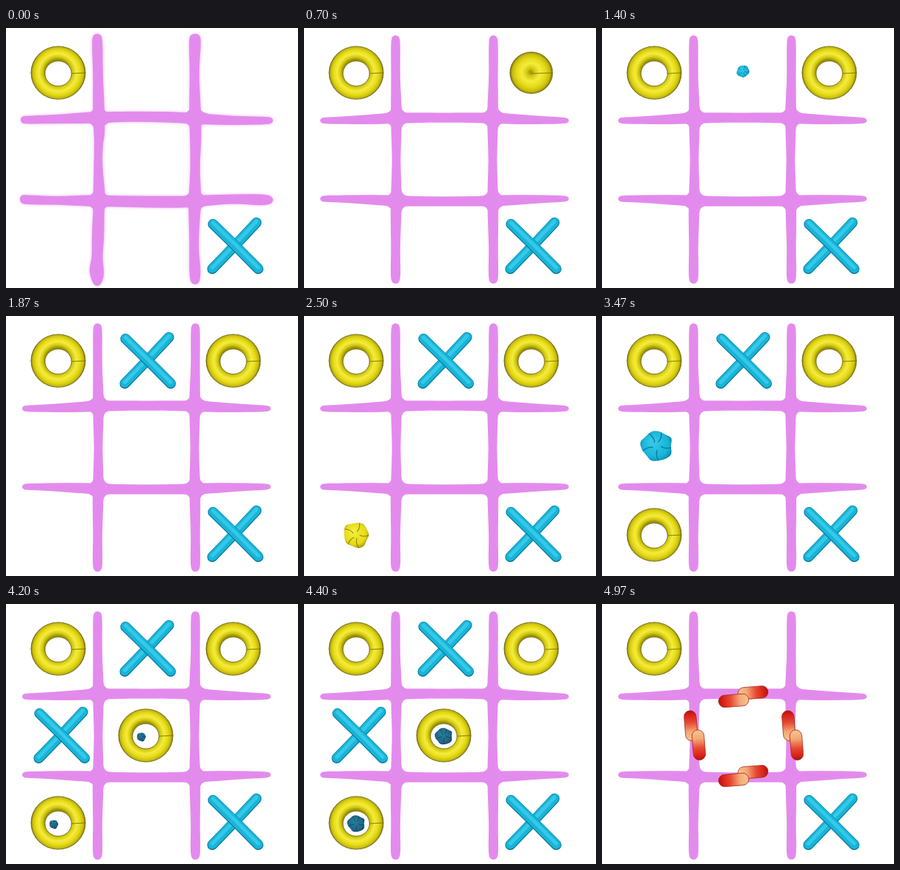
These frames come from a looping animation (397x354 px, 5 s). An HTML page with a canvas:

```html
<!DOCTYPE html>
<html lang="en">
<head>
<meta charset="utf-8">
<title>Clay tic-tac-toe</title>
<style>
html, body { margin: 0; width: 100%; height: 100%; overflow: hidden; background: #fff; }
canvas { display: block; }
</style>
</head>
<body>
<canvas id="stage" width="397" height="354"></canvas>
<script>
const ctx = document.getElementById('stage').getContext('2d');
const LOOP = 5000;
const PINK = '#e38bed';
const BLUE = { dark: '#08789a', base: '#18b4d8', light: '#35c9e8' };
const YELLOW = { dark: '#8b8208', base: '#e6da16', light: '#f4ec3c' };
const TEAL = { dark: '#16384c', base: '#1d6888', light: '#287c9c' };

const clamp = v => Math.max(0, Math.min(1, v));
const mix = (a, b, p) => a + (b - a) * p;

function at(x, y, scale, draw) {
  ctx.save();
  ctx.translate(x, y);
  ctx.scale(scale, scale);
  draw();
  ctx.restore();
}

// Closed smooth curve through the midpoints of its corners.
function smooth(pts) {
  const mid = i => {
    const a = pts[i % pts.length], b = pts[(i + 1) % pts.length];
    return [(a[0] + b[0]) / 2, (a[1] + b[1]) / 2];
  };
  ctx.moveTo(...mid(0));
  for (let i = 1; i <= pts.length; i++) ctx.quadraticCurveTo(...pts[i % pts.length], ...mid(i));
  ctx.closePath();
}

// Each knot is [position along the bar, centre line, half width].
function bar(knots, upright) {
  const side = s => knots.map(([p, c, h]) => upright ? [c + s * h, p] : [p, c + s * h]);
  ctx.beginPath();
  smooth([...side(-1), ...side(1).reverse()]);
  ctx.fill();
}

function joint(x, y) {
  const r = 17, c = 6;
  ctx.beginPath();
  for (let i = 0; i < 4; i++) {
    const a = i * Math.PI / 2, cos = Math.cos(a), sin = Math.sin(a);
    const turn = (u, v) => [x + u * cos - v * sin, y + u * sin + v * cos];
    const start = turn(r, -c);
    if (i) ctx.lineTo(...start); else ctx.moveTo(...start);
    ctx.lineTo(...turn(r, c));
    ctx.quadraticCurveTo(...turn(c + 1, c + 1), ...turn(c, r));
  }
  ctx.fill();
}

function smoothGrid() {
  ctx.fillStyle = PINK;
  for (const [x, lean] of [[124.5, 1], [257.5, -1]]) {
    bar([[10, x, 5], [22, x, 6.5], [70, x, 6], [108, x + lean, 7.5], [145, x + lean, 7],
      [180, x + lean, 5.5], [215, x + lean, 7], [255, x + lean / 2, 7.5],
      [300, x, 6], [336, x, 7], [348, x, 5]], true);
  }
  for (const [y, bow] of [[126, -4], [232.5, 3.5]]) {
    bar([[22, y, 4], [36, y, 4.5], [75, y + bow / 5, 6], [112, y + bow * .7, 7.5],
      [150, y + bow, 7], [190, y + bow, 6.5], [235, y + bow, 7],
      [272, y + bow * .7, 7.5], [310, y + bow / 5, 6], [348, y, 4.5], [360, y, 3.5]]);
  }
  for (const x of [126, 257]) for (const y of [122.5, 235.5]) joint(x, y);
}

function roughGrid() {
  ctx.save();
  ctx.fillStyle = PINK;
  ctx.shadowColor = '#eebcf4';
  ctx.shadowBlur = 4;
  bar([[8, 124, 5], [18, 124, 7.5], [60, 125, 6.5], [110, 126, 8], [146, 127, 7.5], [155, 126, 6],
    [185, 125, 5.5], [230, 127, 8.5], [250, 126, 7.5], [285, 125, 8.5], [312, 124, 7],
    [328, 123, 10], [340, 124, 9], [351, 124, 4]], true);
  bar([[8, 257, 6], [18, 257, 8.5], [60, 256, 6], [112, 257, 8], [150, 258, 8], [190, 257, 6],
    [235, 257, 9], [260, 256, 7.5], [300, 255.5, 6], [330, 257, 8], [349, 257, 6]], true);
  bar([[20, 125, 5], [32, 125, 5.5], [70, 124, 6], [115, 122, 8], [150, 121, 7], [190, 120.5, 7],
    [240, 122, 7.5], [270, 124, 7.5], [310, 126, 6], [350, 126, 5.5], [363, 126, 4]]);
  bar([[19, 233, 6], [32, 234, 6.5], [70, 235, 5.5], [115, 235, 8], [150, 236, 7.5], [190, 236.5, 8],
    [240, 237, 8], [270, 235, 7.5], [310, 232.5, 6], [348, 234, 8], [363, 234, 5]]);
  ctx.shadowColor = 'transparent';
  for (const x of [126, 257]) for (const y of [122.5, 235.5]) joint(x, y);
  ctx.restore();
}

function ball(x, y, r, tone, seed) {
  const wobble = i => r * (.98 + .1 * Math.sin(i * 2.3 + seed) + .05 * Math.sin(i * 5.1 + seed * 2));
  const pts = Array.from({ length: 13 }, (_, i) => {
    const a = i / 13 * Math.PI * 2;
    return [Math.cos(a) * wobble(i), Math.sin(a) * wobble(i)];
  });
  at(x, y, 1, () => {
    const g = ctx.createRadialGradient(-r * .25, -r * .3, r * .1, 0, 0, r * 1.12);
    g.addColorStop(0, tone.light);
    g.addColorStop(.7, tone.base);
    g.addColorStop(1, tone.dark);
    ctx.fillStyle = g;
    ctx.beginPath();
    smooth(pts);
    ctx.fill();
    ctx.clip();
    ctx.strokeStyle = tone.dark;
    ctx.lineWidth = Math.max(.7, r * .06);
    for (let i = 0; i < 5; i++) {
      const a = i * 1.35 + seed, u = Math.cos(a) * r, v = Math.sin(a) * r;
      ctx.beginPath();
      ctx.moveTo(u, v);
      ctx.quadraticCurveTo(u * .55 - v * .2, v * .55 + u * .2, u * .25, v * .25);
      ctx.stroke();
    }
  });
}

function ring(x, y, hole = 1) {
  at(x, y, 1, () => {
    const inner = 18 * hole, outer = mix(29, 37, hole);
    const g = ctx.createRadialGradient(-1, -1, Math.max(0, inner - 1), 0, 0, outer);
    g.addColorStop(0, '#989008');
    g.addColorStop(.18, '#d2c810');
    g.addColorStop(.42, YELLOW.light);
    g.addColorStop(.68, YELLOW.base);
    g.addColorStop(.88, '#c4ba10');
    g.addColorStop(1, '#766e08');
    ctx.fillStyle = g;
    ctx.beginPath();
    ctx.ellipse(0, 0, outer, outer * .975, 0, 0, Math.PI * 2);
    ctx.ellipse(0, 1, inner, inner * .95, 0, 0, Math.PI * 2);
    ctx.fill('evenodd');
    ctx.lineWidth = .8;
    ctx.strokeStyle = '#6c6510';
    ctx.stroke();
  });
}

function arm(x1, y1, x2, y2) {
  ctx.lineCap = 'round';
  const layers = [[14, 0, BLUE.dark], [12.2, -.5, BLUE.base], [5, -1.8, BLUE.light]];
  for (const [width, shift, color] of layers) {
    ctx.strokeStyle = color;
    ctx.lineWidth = width;
    ctx.beginPath();
    ctx.moveTo(x1, y1 + shift);
    ctx.quadraticCurveTo((x1 + x2) / 2 + 1, (y1 + y2) / 2 + shift, x2, y2 + shift);
    ctx.stroke();
  }
}

function cross(x, y, size = 1) {
  at(x, y, 1, () => {
    arm(28.5 * size, -32 * size, -31.5 * size, 31 * size);
    arm(-30.5 * size, -30 * size, 31 * size, 31 * size);
  });
}

function growRing(x, y, p) {
  if (p < .5) ball(x, y, mix(8, 28, p * 2), YELLOW, p * 9);
  else ring(x, y, (p - .5) * 2);
}

function growCross(x, y, p) {
  if (p >= .5) cross(x, y, mix(.4, 1, (p - .5) * 2));
  if (p < .75) ball(x - 1.5, y - 2, p < .5 ? mix(8.5, 22, p * 2.2) : mix(22, 6, (p - .5) * 4), BLUE, p * 9 + 1);
}

function pill(x, y, flip) {
  at(x, y, 1, () => {
    ctx.rotate(-.08);
    ctx.scale(flip, 1);
    const g = ctx.createLinearGradient(-21, 0, 21, 0);
    g.addColorStop(0, '#f8c890');
    g.addColorStop(.3, '#f4a878');
    g.addColorStop(.6, '#e64a32');
    g.addColorStop(.85, '#d92018');
    g.addColorStop(1, '#a81410');
    ctx.fillStyle = g;
    ctx.strokeStyle = '#a8281c';
    ctx.lineWidth = .8;
    ctx.beginPath();
    ctx.roundRect(-20.5, -8.2, 41, 16.4, 8);
    ctx.fill();
    ctx.stroke();
  });
}

function pills(x, y, upright, size) {
  at(x, y, size, () => {
    if (upright) ctx.rotate(-Math.PI / 2);
    pill(13.3, -5.2, 1);
    pill(-13, 5.5, -1);
  });
}

const moves = [
  { draw: growRing, x: 309, y: 61, start: 500, end: 900, steps: 8 },
  { draw: growCross, x: 193, y: 61, start: 1400, end: 1870, steps: 9 },
  { draw: growRing, x: 71, y: 298, start: 2370, end: 2770, steps: 8 },
  { draw: growCross, x: 76, y: 179, start: 3270, end: 3700, steps: 9 }
];

function stepped(t, start, end, steps) {
  return Math.floor(clamp((t - start) / (end - start)) * steps + 1e-6) / steps;
}

function render(t) {
  ctx.fillStyle = '#fff';
  ctx.fillRect(0, 0, 397, 354);
  if (t < 500) roughGrid(); else smoothGrid();
  ring(71, 61);
  cross(312, 297);

  if (t >= 4900) {
    const size = t < 4970 ? .5 : 1;
    for (const y of [126, 234]) pills(192, y, false, size);
    for (const x of [126, 259]) pills(x, 179, true, size);
    return;
  }
  for (const m of moves) {
    if (t >= m.start) m.draw(m.x, m.y, stepped(t, m.start, m.end, m.steps));
  }
  if (t >= 4200) {
    ring(190, 179);
    const p = stepped(t, 4200, 4400, 4);
    for (const [x, y] of [[190, 180], [71, 299]]) {
      ball(x - mix(6, 0, p), y + mix(1, 0, p), mix(6.2, 12, p), TEAL, p * 3 + 2);
    }
  }
}

const origin = performance.now();
function tick() {
  render((performance.now() - origin) % LOOP);
  requestAnimationFrame(tick);
}
tick();
</script>
</body>
</html>
```
